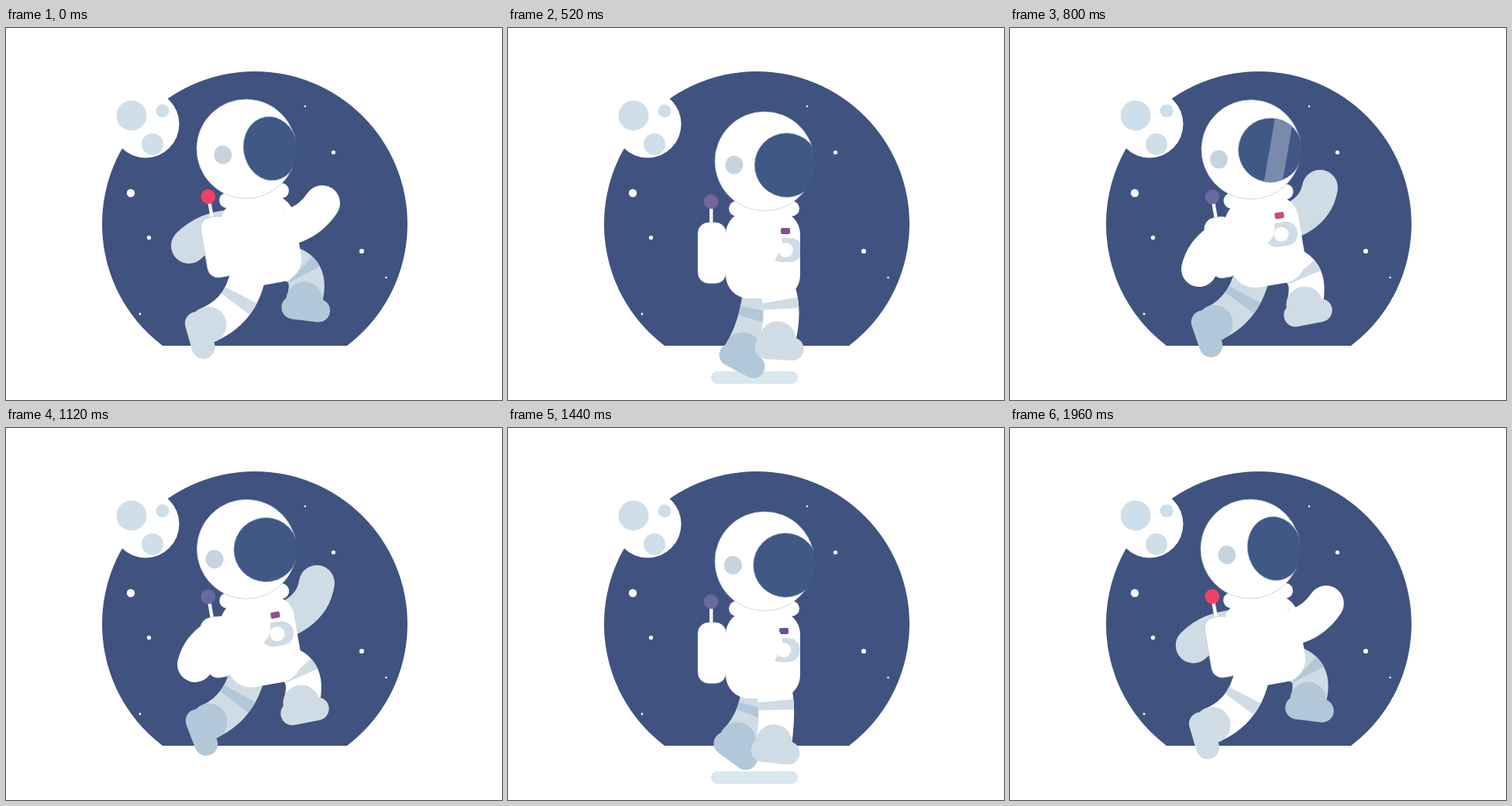
An HTML page with a canvas for the animation above (2 s loop, 640 by 480 pixels).

```html
<!DOCTYPE html>
<html lang="en">
<head>
<meta charset="utf-8">
<title>Running astronaut</title>
<style>
  html, body { margin: 0; width: 100%; height: 100%; overflow: hidden; background: #fff; }
  canvas { display: block; }
</style>
</head>
<body>
<canvas id="stage" width="640" height="480"></canvas>
<script>
const ctx = document.getElementById('stage').getContext('2d');
const WHITE = '#fff', NIGHT = '#40527f', PALE = '#cfdce5', SHADE = '#b2c8d8', EDGE = '#b9c4d8';
const LOOP = 2000, STEP = 40, RAD = Math.PI / 180;

const clamp = x => Math.max(0, Math.min(1, x));
const lerp = (a, b, k) => a + (b - a) * k;
const smooth = x => { x = clamp(x); return x * x * (3 - 2 * x); };

// Monotone cubic interpolation through keys
function track(ts, vs, t) {
  const n = ts.length;
  if (t <= ts[0]) return vs[0];
  if (t >= ts[n - 1]) return vs[n - 1];
  const slope = i => (vs[i + 1] - vs[i]) / (ts[i + 1] - ts[i]);
  const tangent = i => {
    if (i === 0 || i === n - 1) return 0;
    const a = slope(i - 1), b = slope(i);
    return a * b <= 0 ? 0 : 2 * a * b / (a + b);
  };
  let i = 0;
  while (t > ts[i + 1]) i++;
  const h = ts[i + 1] - ts[i], x = (t - ts[i]) / h;
  return lerp(vs[i], vs[i + 1], x * x * (3 - 2 * x))
    + h * x * (1 - x) * ((1 - x) * tangent(i) - x * tangent(i + 1));
}

// Limb poses, keyed by distance in ms from the middle of the loop
const KEYS = [120, 200, 320, 440, 480, 640, 1000];
const LIMBS = {
  frontLeg: {
    x: [381, 380, 372, 343, 348, 271, 261], y: [355, 357, 368, 406, 402, 398, 383],
    cx: [394, 392, 383, 351, 360, 309, 310], cy: [306, 308, 318, 355, 355, 365, 362],
    angle: [-11, -11, -9, 6, 3, 53, 74]
  },
  backLeg: {
    x: [262, 264, 273, 296, 303, 366, 385], y: [379, 381, 389, 403, 416, 371, 351],
    cx: [306, 308, 311, 325, 326, 389, 398], cy: [359, 360, 362, 372, 375, 325, 305],
    angle: [69, 71, 60, 36, 28, 17, 7]
  },
  frontArm: {
    x: [244, 244, 262, 312, 312, 396, 408], y: [305, 311, 316, 320, 320, 250, 226],
    cx: [256, 255, 275, 318, 318, 372, 380], cy: [262, 268, 282, 300, 300, 278, 268]
  },
  backArm: {
    x: [401, 400, 383, 325, 325, 278, 236], y: [200, 206, 235, 310, 310, 266, 281],
    cx: [394, 392, 375, 325, 325, 290, 265], cy: [248, 252, 268, 295, 295, 262, 252]
  }
};

function pose(name, d) {
  const out = {};
  for (const key in LIMBS[name]) out[key] = track(KEYS, LIMBS[name][key], d);
  return out;
}

function ellipse(x, y, rx, ry, color) {
  ctx.beginPath();
  ctx.ellipse(x, y, rx, ry, 0, 0, 7);
  ctx.fillStyle = color;
  ctx.fill();
}
const disc = (x, y, r, color) => ellipse(x, y, r, r, color);

function box(x, y, w, h, r, color) {
  ctx.beginPath();
  ctx.roundRect(x, y, w, h, r);
  ctx.fillStyle = color;
  ctx.fill();
}

function outline() {
  ctx.strokeStyle = EDGE;
  ctx.lineWidth = 0.7;
  ctx.stroke();
}

// Thick stroke along the part a..b of a quadratic curve
function tube(x0, y0, limb, color, a = 0, b = 1) {
  const at = (p, c, q, s, t) => lerp(lerp(p, c, s), lerp(c, q, s), t);
  const point = (s, t) => [at(x0, limb.cx, limb.x, s, t), at(y0, limb.cy, limb.y, s, t)];
  ctx.beginPath();
  ctx.moveTo(...point(a, a));
  ctx.quadraticCurveTo(...point(a, b), ...point(b, b));
  ctx.lineCap = b < 1 ? 'butt' : 'round';
  ctx.lineWidth = 46;
  ctx.strokeStyle = color;
  ctx.stroke();
}

function leg(limb, lean, color, trim) {
  const x = 332 + 0.3 * (limb.x - 320), y = 322 - 20 * lean;
  tube(x, y, limb, color);
  tube(x, y, limb, trim, 0.41, 0.55);
  const k = clamp(limb.angle / 74);
  ctx.save();
  ctx.translate(limb.x, limb.y);
  ctx.rotate(limb.angle * RAD);
  disc(0, 0, 23.5, trim);
  box(-29 + 8 * k, -4 + 3 * k, 63 - k, 30, 15, trim);
  ctx.restore();
}

function arm(limb, lean, color) {
  tube(331 - 13 * lean, 275 - 17 * lean, limb, color);
}

function lamp(level) {
  const mix = (a, b) => Math.round(lerp(a, b, level));
  return `rgb(${mix(102, 240)},${mix(106, 66)},${mix(158, 98)})`;
}

function scenery() {
  ctx.fillStyle = WHITE;
  ctx.fillRect(0, 0, 640, 480);
  ctx.save();
  ctx.beginPath();
  ctx.rect(0, 0, 640, 410);
  ctx.clip();
  disc(321, 253, 197, NIGHT);
  ctx.restore();
  const stars = [[161, 213, 5.2], [184.5, 270.5, 2.7], [173, 369, 1.4], [386, 101, 1.2],
    [422.5, 160.5, 2.6], [459, 288, 3.1], [490.5, 322, 1.2]];
  for (const [x, y, r] of stars) disc(x, y, r, WHITE);
  disc(180, 124, 43.5, WHITE);
  for (const [x, y, r] of [[162, 113, 19.5], [202, 107, 8.5], [189, 150, 14]]) disc(x, y, r, '#cfdfe9');
}

// Body parts are placed relative to the centre of the helmet
function inBody(lean, paint) {
  ctx.save();
  ctx.translate(331 - 21 * lean, 172 - 16 * lean);
  ctx.rotate(-10 * lean * RAD);
  paint();
  ctx.restore();
}

function backpack(lean, t) {
  const x = 10 * lean;
  box(x - 71, 58, 4.4, 24, 0, WHITE);
  const glow = track([0, 520, 800, 1440, 1600, 2000], [1, 0.1, 0, 0, 1, 1], t);
  disc(x - 69, 52, 9.5, lamp(glow));
  box(x - 86, 79, 36.5, 78.5, 14, WHITE);
  outline();
}

function torso(turn, t) {
  box(-50, 64, 96, 113, 30, WHITE);
  ctx.save();
  ctx.clip();
  const glow = track([0, 280, 520, 800, 1120, 1440, 1640, 1960, 2000],
    [1, 0.3, 0.2, 0.68, 0.35, 0.05, 1, 0.5, 1], t);
  box(24 + 8 * turn, 86, 12, 8, 2, glow > 0 ? lamp(glow).replace(/,\d+,/, ',78,') : NIGHT);
  const x = 31.5 + 11 * turn;
  box(x - 21, 99, 42, 31, 15, PALE);
  disc(x, 114.5, 9.5, WHITE);
  ctx.restore();
  box(-46, 51, 91, 20, 10, WHITE);
}

function helmet(turn, t) {
  disc(0, 0, 64, WHITE);
  outline();
  ellipse(-37 + 6 * turn, 4 - 1.7 * turn, 11.5, 12, '#c5d4e0');
  ctx.save();
  ctx.beginPath();
  ctx.arc(0, 0, 65, 0, 7);
  ctx.clip();
  const rx = 41.5 - 6.5 * Math.max(0, turn), x = -10.5 + 6.5 * turn + rx;
  ellipse(x, 5, rx, 41.5, '#405885');
  outline();
  ctx.clip();
  // Glint sweeping over the visor
  const sweep = (t - 640) / 280;
  if (sweep > 0 && sweep < 1) {
    ctx.translate(x + lerp(-75, 75, sweep), 5);
    ctx.transform(1, 0, -0.35, 1, 0, 0);
    ctx.fillStyle = '#788bad';
    ctx.fillRect(-12, -50, 25, 100);
  }
  ctx.restore();
}

function draw(t) {
  const d = Math.abs(t - 1000);
  const fromStep = Math.abs(t % 1000 - 480);
  const lean = 1 - (1 - clamp((fromStep - 40) / 440)) ** 3;
  const turn = 2 * smooth((d / 1000 - 0.32) / 0.43) - 1;

  scenery();
  ctx.globalAlpha = clamp((120 - fromStep) / 60);
  box(262, 443, 112, 16, 8, '#d9e7ef');
  ctx.globalAlpha = 1;

  arm(pose('backArm', d), lean, PALE);
  leg(pose('backLeg', d), lean, PALE, SHADE);
  inBody(lean, () => backpack(lean, t));
  leg(pose('frontLeg', d), lean, WHITE, PALE);
  inBody(lean, () => {
    torso(turn, t);
    helmet(turn, t);
  });
  arm(pose('frontArm', d), lean, WHITE);
}

const start = performance.now();
function tick() {
  const t = (performance.now() - start) % LOOP;
  draw(Math.floor(t / STEP) * STEP);
  requestAnimationFrame(tick);
}
tick();
</script>
</body>
</html>
```
